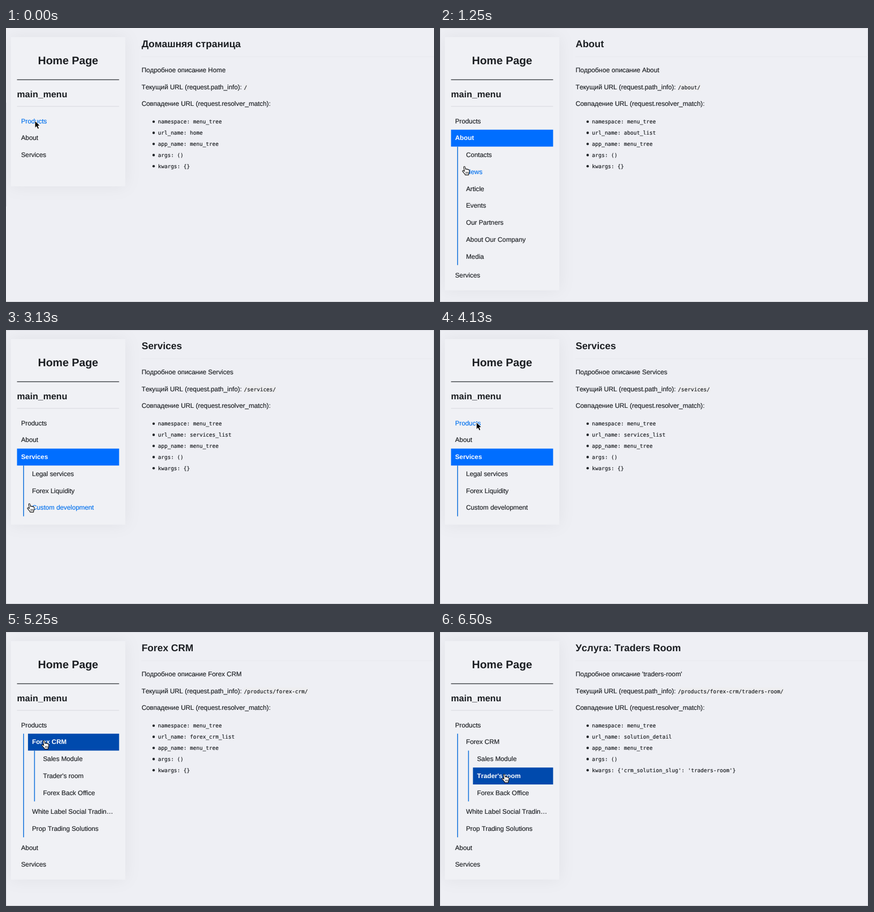
These frames come from a looping animation (800x514 px, 6.63 s). An HTML page:

```html
<!DOCTYPE html>
<html lang="ru">
<head>
<meta charset="utf-8">
<title>Tree menu</title>
<style>
  html, body { margin: 0; width: 100%; height: 100%; overflow: hidden; background: #eeeff4; }
  svg { display: block; width: 800px; height: 514px; }
  text {
    font: 12.22px "Liberation Sans", Arial, sans-serif;
    font-kerning: none; text-rendering: geometricPrecision; white-space: pre;
    color: #1b1e22; fill: currentColor; stroke: currentColor; stroke-width: .18px;
  }
  .para { font-size: 12.28px; }
  .code { font: 9.93px "DejaVu Sans Mono", monospace; }
  .title { font-size: 18.35px; font-weight: bold; stroke: none; }
  .brand { font-size: 20.67px; font-weight: bold; text-anchor: middle; stroke: none; }
  .menu { font-size: 16.9px; font-weight: bold; stroke: none; }
  .hover { color: #0070ee; }
  .active { color: #fff; font-weight: bold; stroke: none; }
  #card { fill: #f0f1f5; filter: drop-shadow(0 0 15px rgba(0, 0, 0, .055)); }
</style>
</head>
<body>
<svg viewBox="0 0 800 514">
  <rect width="800" height="514" fill="#eeeff4"/>
  <rect id="card" x="9" y="17" width="214" height="280"/>
  <path id="frame" fill="none" stroke="#d9dae0"/>
  <path d="M0 513.5H800" stroke="#c9cacf"/>
  <path d="M253 54H800" stroke="#e7e8ed"/>
  <text class="brand" x="116" y="67.6">Home Page</text>
  <path d="M20.6 97H211.4" stroke="#45484d" stroke-width="1.5"/>
  <text class="menu" x="20.6" y="130.2">main_menu</text>
  <path d="M20.6 147H211.4" stroke="#d6d7dc"/>
  <g id="menu"></g>
  <g id="content"></g>
  <g id="cursor">
    <g id="arrow">
      <path d="M0 0V13.5L3.1 10.7L5.3 15.6L7.9 14.4L5.8 9.7H10Z" fill="#000" stroke="#fff" stroke-linejoin="round"/>
    </g>
    <g id="hand" fill="#fff" stroke="#111" stroke-width="1.15" stroke-linejoin="round" stroke-linecap="round">
      <path d="M-1.6 1.2C-1.8 -.5 .6 -.8 1 1L1.9 5.2C2.1 4 4.1 4 4.4 5.4C4.9 4.4 6.5 4.7 6.8 6C7.4 5.3 8.7 5.8 8.8 7C9.1 9.2 8.9 11.3 7.7 13.2L7.5 15.6H1L.8 14.2C-1 12.7 -2.3 10.7 -3.7 9.2C-4.7 8 -3.2 6.6 -1.8 7.7L-.3 9Z"/>
      <path d="M2.5 10.2V13M4.4 10.2V13M6.2 10.2V13" stroke-width=".8"/>
    </g>
  </g>
</svg>
<script>
const LOOP = 6630, TICK = 125, ROW = 31.75, STEP = 20.5, RIGHT = 211.4;

const leaf = s => s.split('|').map(name => ({ name }));
const tree = [
  { name: 'Products', kids: [
    { name: 'Forex CRM', kids: leaf("Sales Module|Trader's room|Forex Back Office") },
    ...leaf('White Label Social Tradin…|Prop Trading Solutions')
  ] },
  { name: 'About', kids: leaf('Contacts|News|Article|Events|Our Partners|About Our Company|Media') },
  { name: 'Services', kids: leaf('Legal services|Forex Liquidity|Custom development') }
];

const page = (open, title, about, url, route, kwargs = '{}') => ({ open, title, about, url, route, kwargs });
const home = page([], 'Домашняя страница', 'Home', '/', 'home');
const products = page(['Products'], 'Products', 'Products', '/products/', 'products_list');
const about = page(['About'], 'About', 'About', '/about/', 'about_list');
const services = page(['Services'], 'Services', 'Services', '/services/', 'services_list');
const forex = page(['Products', 'Forex CRM'], 'Forex CRM', 'Forex CRM', '/products/forex-crm/', 'forex_crm_list');
const room = page(['Products', 'Forex CRM', "Trader's room"], 'Услуга: Traders Room', "'traders-room'",
  '/products/forex-crm/traders-room/', 'solution_detail', "{'crm_solution_slug': 'traders-room'}");

// [first tick, page]
const visits = [[0, home], [2, products], [9, about], [21, services], [34, products], [40, forex], [51, room]];

// [tick, x, y, hovered item]
const moves = [
  [0, 54, 174, 'Products'], [2, 54, 172, ''], [4, 52, 235, 'White Label Social Tradin…'],
  [5, 50, 265, 'White Label Social Tradin…'], [6, 50, 285, 'Prop Trading Solutions'],
  [7, 50, 300, 'About'], [9, 48, 302, 'Article'], [10, 46, 260, 'News'], [11, 44, 215, ''],
  [12, 42, 202, ''], [13, 44, 240, 'Contacts'], [14, 48, 320, 'Events'],
  [15, 50, 395, 'About Our Company'], [16, 52, 432, 'Media'], [18, 52, 444, 'Media'],
  [19, 50, 454, 'Services'], [21, 50, 454, ''], [24, 48, 408, ''],
  [25, 44, 326, 'Custom development'], [26, 42, 270, 'Legal services'], [27, 42, 232, ''],
  [28, 48, 205, 'About'], [29, 57, 184, 'Products'], [31, 68, 173, 'Products'],
  [34, 68, 173, ''], [36, 69, 195, 'Forex CRM'], [38, 71, 204, 'Forex CRM'], [40, 71, 204, ''],
  [42, 71, 204, ''], [44, 66, 230, 'Sales Module'], [46, 95, 262, "Trader's room"],
  [48, 113, 274, "Trader's room"], [49, 116, 291, 'Forex Back Office'],
  [50, 119, 272, "Trader's room"], [51, 120, 267, ''], [52, 120, 267, '']
];

const $ = id => document.getElementById(id);
const latest = (list, tick) => list.reduce((found, row, i) => row[0] <= tick ? i : found, 0);
const label = (x, y, s, cls = '') => `<text x="${x}" y="${y}" class="${cls}">${s}</text>`;
const box = (x, y, w, h, fill) => `<rect x="${x}" y="${y}" width="${w}" height="${h}" fill="${fill}"/>`;

function menuRows(items, level, y, open, hover, out) {
  const x = 20.6 + level * STEP;
  for (const { name, kids } of items) {
    const active = name === open[open.length - 1];
    if (active) out.push(box(x, y, RIGHT - x, ROW, level ? '#004aad' : '#006eff'));
    out.push(label(x + 7.6, y + 19.5, name, active ? 'active' : name === hover ? 'hover' : ''));
    y += ROW;
    if (kids && open.includes(name)) {
      const end = menuRows(kids, level + 1, y, open, hover, out);
      out.push(box(x + 11.4, y, 1.6, end - y, '#1674dc'));
      y = end + 3.9;
    }
  }
  return y;
}

function showContent(p) {
  const facts = ['namespace: menu_tree', 'url_name: ' + p.route, 'app_name: menu_tree', 'args: ()', 'kwargs: ' + p.kwargs];
  $('content').innerHTML =
    label(253.4, 36.3, p.title, 'title') +
    label(253.4, 82.8, 'Подробное описание ' + p.about, 'para') +
    label(253.4, 114.6, 'Текущий URL (request.path_info):', 'para') +
    box(444.5, 104.5, p.url.length * 5.98 + 1, 13, '#eeeef0') +
    label(444.8, 114.6, p.url, 'code') +
    label(253.4, 146.2, 'Совпадение URL (request.resolver_match):', 'para') +
    facts.map((s, i) => {
      const y = 176 + i * 20.87;
      return `<circle cx="276" cy="${y - .2}" r="2.3" fill="#212529"/>` + label(284, y + 3.4, s, 'code');
    }).join('');
}

function showCursor(tick, i) {
  const [t0, x0, y0] = moves[i];
  const [t1, x1, y1] = moves[i + 1] || moves[i];
  const k = t1 > t0 ? (tick - t0) / (t1 - t0) : 0;
  $('cursor').setAttribute('transform', `translate(${x0 + (x1 - x0) * k} ${y0 + (y1 - y0) * k})`);
  const arrow = tick === 0 || (tick > 30 && tick < 34);
  $('arrow').style.display = arrow ? '' : 'none';
  $('hand').style.display = arrow ? 'none' : '';
}

function draw(tick) {
  const p = visits[latest(visits, tick)][1];
  const i = latest(moves, tick);
  const rows = [];
  const end = menuRows(tree, 0, 159, p.open, moves[i][3], rows);
  $('menu').innerHTML = rows.join('');
  $('card').setAttribute('height', Math.max(280, end + 11.8 - 17));
  $('frame').setAttribute('d', tick ? 'M.5 514V.5H799.5V514' : 'M.5 140V335');
  showContent(p);
  showCursor(tick, i);
}

let shown = -1;
function loop() {
  const tick = Math.min(52, Math.floor(performance.now() % LOOP / TICK));
  if (tick !== shown) draw(shown = tick);
  requestAnimationFrame(loop);
}
loop();
</script>
</body>
</html>
```
